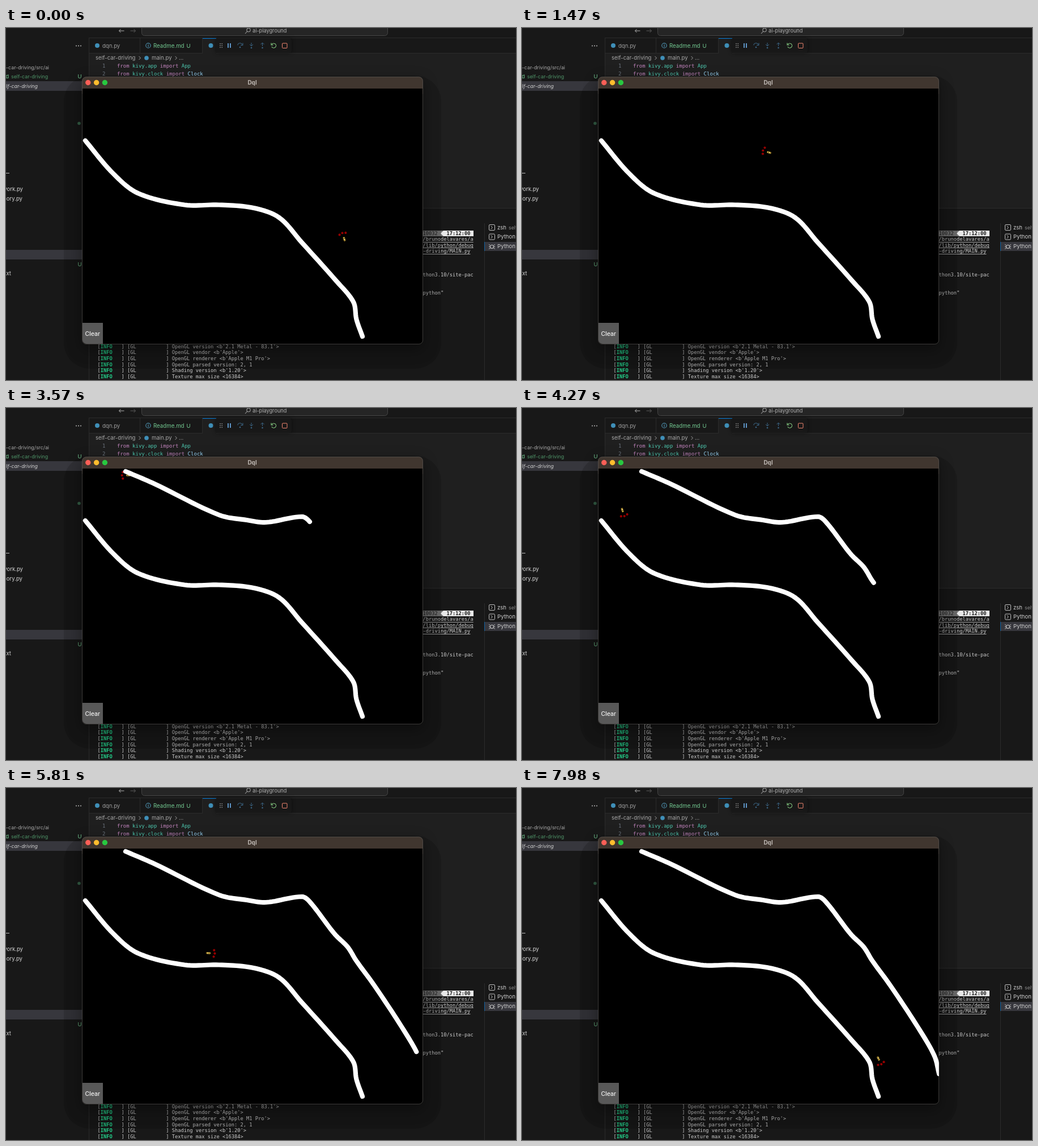
Animation of 900 by 622 pixels, one loop 8000 ms. Source, as an HTML page with a canvas:

```html
<!DOCTYPE html>
<html lang="en">
<head>
<meta charset="utf-8">
<title>Self-driving car</title>
<style>
  html, body { margin: 0; width: 100%; height: 100%; overflow: hidden; background: #181818; }
  canvas { display: block; width: 900px; height: 622px; }
</style>
</head>
<body>
<canvas id="stage" width="900" height="622"></canvas>
<script>
const LOOP = 8000, STEP = 70, SPEED = 0.155, SMOOTH = 12;
const SANS = 'Inter, sans-serif', MONO = '"DejaVu Sans Mono", monospace';
const FG = '#cccccc', GREEN = '#73c991', BLUE = '#3f8fb8', DIM = '#3b6585';
const ctx = document.getElementById('stage').getContext('2d');

// Where the car passes and which way it points then
const route = [
  { t: 0, x: 597, y: 373, deg: -108 },
  { t: 1470, x: 436, y: 220, deg: -162 },
  { t: 2450, x: 323, y: 114, deg: 180 },
  { t: 3570, x: 216, y: 119, deg: 180 },
  { t: 4200, x: 174, y: 170, deg: 75 },
  { t: 5040, x: 242, y: 280, deg: 45 },
  { t: 5880, x: 368, y: 293, deg: 10 },
  { t: 6650, x: 488, y: 321, deg: 27 },
  { t: 7980, x: 629, y: 478, deg: 63 }
];

const lowerWall = smooth([
  [140, 199], [188, 256], [233, 292], [315, 312.5], [376, 312.5], [437, 318],
  [482, 335], [522, 379], [582, 446], [613, 484], [618.5, 515], [629, 545]
]);

const upperKeys = [
  [211, 112], [262, 134], [376, 189], [425, 198], [459, 202], [522, 192], [536, 201],
  [580, 258], [603, 281], [618, 305], [650, 349], [702, 428], [728, 474], [736, 505]
];
const upperWall = smooth(upperKeys);
// When the brush reaches a given key
const brush = [[1640, 0], [2450, 3], [3150, 4], [3570, 6], [4200, 9], [5040, 10], [5880, 12], [6500, 13]];

function hermite(a, b, ma, mb, u) {
  const v = 1 - u;
  return (1 + 2 * u) * v * v * a + u * v * v * ma + u * u * (1 + 2 * v) * b - u * u * v * mb;
}

function smooth(keys) {
  const chord = (p, q) => Math.hypot(q[0] - p[0], q[1] - p[1]);
  const tangents = keys.map((k, i) => {
    const p = keys[i - 1] ?? k, n = keys[i + 1] ?? k, len = chord(p, k) + chord(k, n);
    return [(n[0] - p[0]) / len, (n[1] - p[1]) / len];
  });
  const points = [];
  for (let i = 0; i < keys.length - 1; i++) {
    const a = keys[i], b = keys[i + 1], len = chord(a, b);
    for (let s = 0; s < SMOOTH; s++) {
      points.push([0, 1].map(c =>
        hermite(a[c], b[c], tangents[i][c] * len, tangents[i + 1][c] * len, s / SMOOTH)));
    }
  }
  return [...points, keys[keys.length - 1]];
}

function rect(x, y, w, h, color) {
  ctx.fillStyle = color;
  ctx.fillRect(x, y, w, h);
}

function box(x, y, w, h, r, fill, stroke) {
  ctx.beginPath();
  ctx.roundRect(x, y, w, h, r);
  if (fill) { ctx.fillStyle = fill; ctx.fill(); }
  if (stroke) { ctx.strokeStyle = stroke; ctx.lineWidth = 1; ctx.stroke(); }
}

function dot(x, y, r, color) {
  ctx.fillStyle = color;
  ctx.beginPath();
  ctx.arc(x, y, r, 0, Math.PI * 2);
  ctx.fill();
}

function ring(x, y, r, color, from = 0, to = Math.PI * 2) {
  ctx.strokeStyle = color;
  ctx.lineWidth = 1.1;
  ctx.beginPath();
  ctx.arc(x, y, r, from, to);
  ctx.stroke();
}

function line(points, color, width = 1) {
  ctx.strokeStyle = color;
  ctx.lineWidth = width;
  ctx.beginPath();
  points.forEach(([x, y]) => ctx.lineTo(x, y));
  ctx.stroke();
}

function text(str, x, y, color, size = 9.6, { font = SANS, style = '', align = 'left' } = {}) {
  ctx.font = `${style} ${size}px ${font}`;
  ctx.textAlign = align;
  ctx.fillStyle = color;
  ctx.fillText(str, x, y);
  return x + ctx.measureText(str).width;
}

function code(x, y, size, ...parts) {
  for (const [str, color = FG, style] of parts) x = text(str, x, y, color, size, { font: MONO, style });
}

function arrow(x, y, dx, dy, color) {
  const hx = x + dx, hy = y + dy, k = 3 / Math.hypot(dx, dy);
  const ux = dx * k, uy = dy * k;
  line([[x - dx, y - dy], [hx, hy]], color);
  line([[hx - ux - uy, hy - uy + ux], [hx, hy], [hx - ux + uy, hy - uy - ux]], color);
}

function chevron(x, y, color = '#a0a0a0', r = 1.5) {
  line([[x - r, y - 2 * r], [x + r, y], [x - r, y + 2 * r]], color);
}

function drawSidebar() {
  const right = { align: 'right' }, center = { align: 'center' };
  rect(0, 17, 146, 605, '#181818');
  rect(0, 94, 146, 17, '#37373d');
  rect(0, 392, 146, 17, '#37373d');
  rect(146, 17, 1, 605, '#2b2b2b');
  for (let i = -1; i < 2; i++) dot(128 + i * 4, 31.5, 0.9, FG);
  text('self-car-driving/src/ai', 76, 70, '#a5a5a5', 8.8, right);
  text('d', 5, 86.5, GREEN, 9.6, right);
  text('self-car-driving', 9, 86.5, '#4f9468', 8.9);
  text('self-car-driving', 56, 103, '#d0d0d0', 8.9, { align: 'right', style: 'italic' });
  text('U', 130, 86.5, GREEN, 9.6, center);
  text('U', 130, 418, GREEN, 9.6, center);
  dot(129, 168.5, 2.8, '#3a6a4d');
  rect(0, 256, 6, 1, '#bbbbbb');
  text('network.py', 30, 285.5, '#d4d4d4', 9.6, right);
  text('memory.py', 29, 302, '#d4d4d4', 9.6, right);
  text('txt', 9, 434.5, '#d4d4d4', 9.6, right);
}

function drawHeader() {
  rect(0, 0, 900, 17, '#181818');
  arrow(204, 5, -4.5, 0, '#b0b0b0');
  arrow(224, 5, 4.5, 0, '#5c5c5c');
  box(239.5, -10, 434, 23.5, 5, '#252525', '#454545');
  ring(428, 3.5, 3.2, '#9a9a9a');
  line([[425.6, 6], [422, 10]], '#9a9a9a', 1.1);
  text('ai-playground', 435, 5.3, '#b2b2b2', 9.2);
  rect(0, 17, 900, 1, '#2b2b2b');
}

function drawTabs() {
  rect(147, 18, 753, 26, '#181818');
  rect(147, 44, 753, 1, '#2b2b2b');
  rect(236, 18, 1, 27, '#2b2b2b');
  rect(346, 18, 1, 27, '#2b2b2b');
  rect(347, 18, 24, 27, '#1f1f1f');
  rect(347, 18, 24, 1, '#0078d4');
  dot(161, 31, 4, BLUE);
  text('dqn.py', 170, 32, '#9d9d9d');
  ring(251, 31, 4.2, '#519aba');
  rect(250.5, 30, 1.1, 3.5, '#519aba');
  rect(250.5, 28.3, 1.1, 1.1, '#519aba');
  text('Readme.md', 260, 32, GREEN, 9.7);
  text('U', 318.5, 32, GREEN);
  dot(361.5, 31, 4, BLUE);
}

function drawDebugBar() {
  ctx.save();
  ctx.shadowColor = 'rgba(0,0,0,.5)';
  ctx.shadowBlur = 6;
  box(370, 18, 134, 26, 4, '#181818');
  ctx.restore();
  for (let i = 0; i < 6; i++) dot(378 + (i % 2) * 3.2, 27.8 + (i >> 1) * 3.2, 0.8, '#b5b5b5');
  rect(391.2, 27, 1.5, 8, '#75beff');
  rect(395.2, 27, 1.5, 8, '#75beff');
  ring(413, 31, 4.3, DIM, Math.PI * 1.05, Math.PI * 1.9);
  line([[418, 26.5], [418, 30.5], [414, 30.5]], DIM);
  dot(413, 34, 1.3, DIM);
  arrow(433, 29, 0, 3, DIM);
  dot(433, 35, 1.3, DIM);
  arrow(452.5, 29, 0, -3, DIM);
  dot(452.5, 35, 1.3, DIM);
  ring(472.5, 31.2, 4, '#89d185', -2.6, 2.7);
  line([[468, 26.5], [468, 30], [471.5, 30]], '#89d185', 1.1);
  box(487.5, 27, 8.5, 8.5, 1, null, '#f48771');
}

function drawCode() {
  text('self-car-driving', 158, 53.5, '#a9a9a9');
  chevron(236, 53);
  dot(248, 53, 3.8, BLUE);
  text('main.py', 257, 53.5, '#a9a9a9');
  chevron(300, 53);
  text('...', 305, 53.5, '#a9a9a9');
  const pink = '#c586c0', teal = '#4ec9b0';
  [['kivy.app ', 'App', teal], ['kivy.clock ', 'Clock', '#9cdcfe']].forEach(([pkg, name, color], i) => {
    const y = 68 + i * 13.5;
    code(170, y, 9, [String(i + 1), '#6e7681']);
    code(196, y, 9, ['from ', pink], [pkg, teal], ['import ', pink], [name, color]);
  });
}

function drawPanel() {
  const size = 8.72, pitch = 10.55;
  rect(147, 318, 753, 304, '#181818');
  rect(147, 318, 753, 1, '#2b2b2b');
  rect(844, 345, 1, 277, '#2b2b2b');

  rect(735, 358, 37, 10, '#777777');
  rect(772, 358, 53, 10, '#e8e8e8');
  ctx.fillStyle = '#e8e8e8';
  ctx.beginPath();
  ctx.moveTo(772, 358);
  ctx.lineTo(767, 363);
  ctx.lineTo(772, 368);
  ctx.fill();
  code(735.5, 363.3, size, ['10032', '#1c1c1c']);
  code(777.5, 363.3, size, ['17:12:00', '#1a1a1a', 'bold']);

  ['/brunodelavares/a', '/lib/python/debug', '-driving/MAIN.py'].forEach((str, i) => {
    const y = 373.8 + i * pitch;
    code(735.5, y, size, [str]);
    rect(735.5, Math.round(y + 4), ctx.measureText(str).width, 1, '#a8a8a8');
  });
  code(735.5, 437, size, ['thon3.10/site-pac']);
  code(735.5, 468.6, size, ['python"']);

  [
    "OpenGL version <b'2.1 Metal - 83.1'>", "OpenGL vendor <b'Apple'>",
    "OpenGL renderer <b'Apple M1 Pro'>", 'OpenGL parsed version: 2, 1',
    "Shading version <b'1.20'>", 'Texture max size <16384>'
  ].forEach((str, i) => code(161.5, 563.6 + i * pitch, size,
    ['['], ['INFO', '#23d18b', 'bold'], ['   ] [GL          ] ' + str]));
}

function drawTerminals() {
  rect(845, 378, 55, 16, '#37373d');
  rect(844, 378, 1, 16, '#0d62a3');
  for (const y of [352.5, 369]) {
    box(852.5, y - 5, 10, 10, 1.5, null, '#c0c0c0');
    chevron(857, y, '#c0c0c0', 1.4);
  }
  ring(857.5, 386.5, 3, '#c0c0c0');
  for (const side of [-1, 1]) {
    for (const dy of [-4, 0, 4]) {
      line([[857.5 + side * 2.8, 386.5 + dy / 2], [857.5 + side * 5.5, 386.5 + dy]], '#c0c0c0');
    }
  }
  text('zsh', 867, 353, FG);
  text('self', 887, 353.3, '#8a8a8a', 8.8);
  text('Python', 867, 369.6, FG);
  text('Python', 867, 386.2, FG);
}

function drawEditor() {
  rect(0, 0, 900, 622, '#1f1f1f');
  drawHeader();
  drawTabs();
  drawDebugBar();
  drawCode();
  drawPanel();
  drawTerminals();
  drawSidebar();
}

function drawWindow() {
  box(102, 84, 666, 518, 46, 'rgba(0,0,0,.15)');
  ctx.save();
  ctx.shadowColor = 'rgba(0,0,0,.4)';
  ctx.shadowBlur = 26;
  ctx.shadowOffsetY = 8;
  box(134.5, 86.5, 601, 472, 7, '#000');
  ctx.restore();
  box(134.5, 86.5, 601, 30, [7, 7, 0, 0], '#40362f');
  rect(135, 107, 600, 440, '#000');
  ['#fe5f57', '#febc2e', '#28c840'].forEach((color, i) => dot(144.8 + i * 14.8, 96.5, 4.7, color));
  text('Dql', 434.5, 96.7, '#bdb7b2', 10, { align: 'center', style: 'bold' });
}

function segment(keys, t, time) {
  let i = 0;
  while (i < keys.length - 2 && t > time(keys[i + 1])) i++;
  const a = keys[i], b = keys[i + 1], span = time(b) - time(a);
  return { a, b, span, u: Math.min(Math.max((t - time(a)) / span, 0), 1) };
}

function carAt(t) {
  const { a, b, span, u } = segment(route, t, k => k.t);
  const pull = (k, trig) => SPEED * span * trig(k.deg * Math.PI / 180);
  const at = u => [
    hermite(a.x, b.x, pull(a, Math.cos), pull(b, Math.cos), u),
    hermite(a.y, b.y, pull(a, Math.sin), pull(b, Math.sin), u)
  ];
  const [x, y] = at(u), [px, py] = at(u - 0.005), [nx, ny] = at(u + 0.005);
  return { x, y, angle: Math.atan2(ny - py, nx - px) };
}

function drawCar(t) {
  const { x, y, angle } = carAt(t);
  for (const side of [-1, 0, 1]) {
    const dir = angle + side * Math.PI / 6;
    dot(x + 11.3 * Math.cos(dir), y + 11.3 * Math.sin(dir), 2.1, '#950000');
  }
  ctx.save();
  ctx.translate(x, y);
  ctx.rotate(angle);
  box(-3.7, -1.6, 7.4, 3.2, 1, '#dcb53c');
  rect(0.4, -1.1, 1.3, 2.2, '#3a2c18');
  rect(-2.7, -1, 1, 2, '#5a4420');
  rect(-1.4, -0.7, 1.5, 1.4, '#f6e3a0');
  ctx.restore();
}

function paintedWall(t) {
  if (t < brush[0][0]) return [];
  const { a, b, u } = segment(brush, t, k => k[0]);
  return upperWall.slice(0, Math.round((a[1] + (b[1] - a[1]) * u) * SMOOTH) + 1);
}

function drawWorld(t) {
  ctx.save();
  ctx.beginPath();
  ctx.rect(135, 107, 601, 451);
  ctx.clip();
  drawCar(t);
  ctx.lineCap = ctx.lineJoin = 'round';
  line(lowerWall, '#fff', 8.2);
  line(paintedWall(t), '#fff', 8.2);
  ctx.restore();
  box(135, 521, 36, 37, [0, 0, 0, 7], '#585858');
  text('Clear', 152.7, 540.3, '#ffffff', 11.5, { font: 'Roboto, sans-serif', align: 'center' });
  box(134.5, 86.5, 601, 472, 7, null, 'rgba(150,145,140,.38)');
}

function frame() {
  const now = performance.now() % LOOP;
  ctx.textBaseline = 'middle';
  drawEditor();
  drawWindow();
  drawWorld(Math.floor(now / STEP) * STEP);
  requestAnimationFrame(frame);
}
frame();
</script>
</body>
</html>
```
